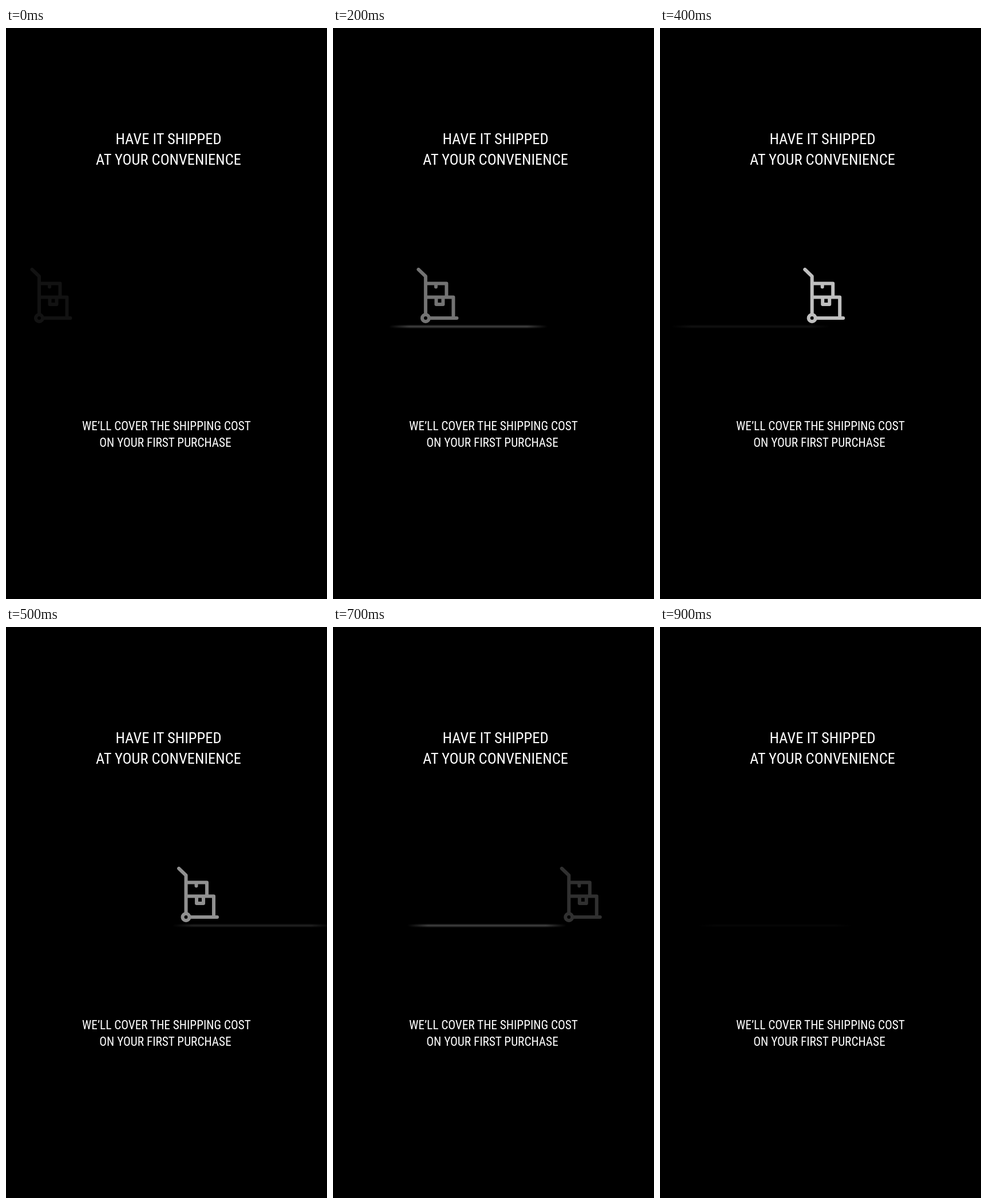
Write an HTML page that moves like this. It is 561 px wide and 998 px high and loops after 1 s.

```html
<!DOCTYPE html>
<html lang="en">
<head>
<meta charset="utf-8">
<title>Shipping</title>
<style>
  html, body { margin: 0; height: 100%; background: #000; overflow: hidden; }
  svg { display: block; width: 100%; height: 100%; }
  text {
    fill: #fff;
    text-anchor: middle;
    font-family: "Roboto Condensed", "Open Sans Condensed", Roboto, "Open Sans", sans-serif;
    font-stretch: 75%;
  }
  #cart {
    fill: none;
    stroke: #fff;
    stroke-width: 6;
    stroke-linecap: round;
    stroke-linejoin: round;
  }
  #floor { filter: blur(.8px); }
</style>
</head>
<body>
<svg viewBox="0 0 561 998">
  <defs>
    <linearGradient id="fade">
      <stop offset="0" stop-color="#fff" stop-opacity="0"/>
      <stop offset=".13" stop-color="#fff"/>
      <stop offset=".87" stop-color="#fff"/>
      <stop offset="1" stop-color="#fff" stop-opacity="0"/>
    </linearGradient>
  </defs>

  <g data-size="29" data-width="254">
    <text x="284" y="194">HAVE IT SHIPPED</text>
    <text x="284" y="230">AT YOUR CONVENIENCE</text>
  </g>
  <g data-size="24" data-width="295">
    <text x="280.5" y="695.5">WE’LL COVER THE SHIPPING COST</text>
    <text x="278.5" y="724">ON YOUR FIRST PURCHASE</text>
  </g>

  <g id="floor"><rect y="520" width="278" height="3.6" fill="url(#fade)"/></g>
  <g id="cart">
    <path d="M-12.5 422 L0 434 V501 M0 446.5 H36.5 V470.5 M18 449 V452.5
             M0 470.5 H48.5 V507 M18.5 470.5 V483 H30.5 V470.5 M6 507 H54.5"/>
    <circle cy="507" r="6"/>
  </g>
</svg>
<script>
  const STEP = 100, STEPS = 10;
  const CAP = .711;
  const cart = document.getElementById('cart');
  const floor = document.getElementById('floor');

  // Keys are [step, value] pairs, joined by straight lines.
  const cartX = [[0, 58], [4, 265.7], [9, 510]];
  const cartAlpha = [[0, .07], [2, .45], [4, .75], [7, .19], [8, .02], [9, 0]];
  const floorX = [[0, 292], [3, 0], [4, 19], [5, 290], [7, 130], [9, 62]];
  const floorAlpha = [[0, 0], [2, .27], [3, .22], [4, .07], [5, .14], [7, .27], [8, .06], [9, .025]];

  function at(keys, t) {
    const i = Math.max(1, keys.findIndex(k => k[0] >= t));
    const [[t0, a], [t1, b]] = [keys[i - 1], keys[i]];
    return a + (b - a) * (t - t0) / (t1 - t0);
  }

  function place(el, xs, alphas, t) {
    el.setAttribute('transform', `translate(${at(xs, t)} 0)`);
    el.setAttribute('opacity', at(alphas, t));
  }

  // One type size per block, chosen from its widest line; lines centre on their y.
  function setType(block) {
    const lines = [...block.children];
    const { size, width } = block.dataset;
    block.style.fontSize = size + 'px';
    const widest = Math.max(...lines.map(l => l.getComputedTextLength()));
    const fitted = size * Math.min(1, width / widest);
    block.style.fontSize = fitted + 'px';
    for (const l of lines) l.setAttribute('dy', fitted * CAP / 2);
  }

  function draw(now) {
    const t = Math.floor(now / STEP) % STEPS;
    place(cart, cartX, cartAlpha, t);
    place(floor, floorX, floorAlpha, t);
    requestAnimationFrame(draw);
  }

  document.querySelectorAll('[data-size]').forEach(setType);
  requestAnimationFrame(draw);
</script>
</body>
</html>
```
